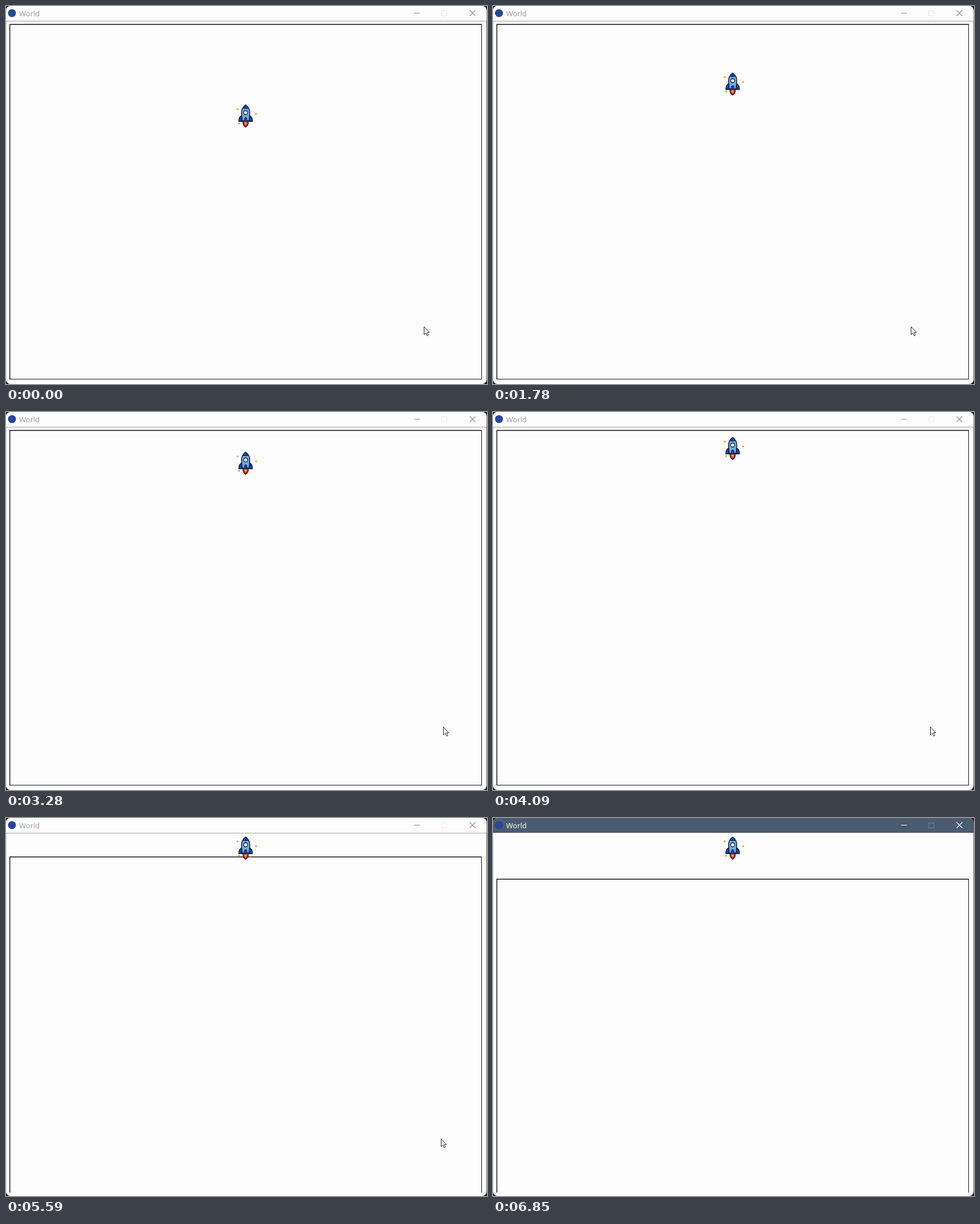
These frames come from a looping animation (845 by 663 pixels, 6.89 s). An HTML page with a canvas:

```html
<!DOCTYPE html>
<html>
<head>
<meta charset="utf-8">
<style>
html, body { margin: 0; width: 100%; height: 100%; overflow: hidden; background: #111; }
canvas { display: block; }
</style>
</head>
<body>
<canvas id="stage" width="845" height="663"></canvas>
<script>
const ctx = document.getElementById('stage').getContext('2d');
const LOOP = 6890, STEP = LOOP / 170;
const SPEED = 0.03145;     // world pixels per ms
const CLIMB = 140;         // rocket stops here, then the scene slides down
const ACTIVE_AT = 6720;    // title bar gains focus
const PAPER = '#fdfdfd', INK = '#0b1638';

// Pointer path: time, x, y
const pointer = [
  [0, 734, 562], [2380, 734, 562], [2680, 768, 552], [4110, 768, 552],
  [4400, 764, 562], [5750, 764, 562], [6200, 781, 638], [6360, 784, 670]
];

function pointerAt(t) {
  const i = pointer.findIndex(p => p[0] > t);
  if (i < 0) return pointer[pointer.length - 1].slice(1);
  const [t0, x0, y0] = pointer[i - 1], [t1, x1, y1] = pointer[i];
  const k = (t - t0) / (t1 - t0), e = k * k * (3 - 2 * k);
  return [Math.round(x0 + (x1 - x0) * e), Math.round(y0 + (y1 - y0) * e)];
}

function rect(color, x, y, w, h) {
  ctx.fillStyle = color;
  ctx.fillRect(x, y, w, h);
}

function shape(path, fill, stroke, width = 1) {
  const p = new Path2D(path);
  if (fill) { ctx.fillStyle = fill; ctx.fill(p); }
  if (stroke) { ctx.strokeStyle = stroke; ctx.lineWidth = width; ctx.stroke(p); }
}

function disc(x, y, r, fill, stroke) {
  ctx.beginPath();
  ctx.arc(x, y, r, 0, 7);
  ctx.fillStyle = fill;
  ctx.fill();
  if (stroke) { ctx.strokeStyle = stroke; ctx.lineWidth = 1.3; ctx.stroke(); }
}

function at(x, y, draw) {
  ctx.save();
  ctx.translate(x, y);
  draw();
  ctx.restore();
}

function spark(x, y, r, color) {
  shape(`M${x} ${y - r}L${x + r} ${y}L${x} ${y + r}L${x - r} ${y}Z`, color);
}

function rocket() {
  for (const [x, y] of [[-14, -12], [18.3, -3.5], [-11.5, 13.2]]) spark(x, y, 2.1, '#cfae32');
  for (const [x, y] of [[-18, 0], [-15, 0], [15.5, -12], [16, 9.5], [-8, -16], [8.5, 16]])
    rect('#c9dce6', x - .6, y - .6, 1.3, 1.3);
  shape('M-4.5 9C-5.5 14-3 18 0 19.4C3 18 5.5 14 4.5 9Z', '#c8202f', '#4a1020', 1.2);
  shape('M-2 9C-3 13-1 15 0 16C1 15 3 13 2 9Z', '#f0a52c');
  shape('M-7-1C-10 1-12.3 3-12 9.5H-5ZM7-1C10 1 12.3 3 12 9.5H5Z', '#1c419f', INK, 1.3);
  shape('M0-19.5C-5-16-7.5-11-7.3-5L-6 8.5H6L7.3-5C7.5-11 5-16 0-19.5Z', '#6fabd9', INK, 1.4);
  shape('M-5-14C-4-17-2-18.7 0-19.5C2-18.7 4-17 5-14Q0-12 -5-14Z', '#1c419f', INK);
  disc(0, -6, 3.5, '#f2f8fb', INK);
  shape('M-2 10V4Q0 .5 2 4V10Z', '#1c419f', INK);
}

function titleBar(active) {
  rect(active ? '#4c5b70' : PAPER, 0, 0, 845, 26);
  if (!active) rect('#a3a3a3', 0, 26, 845, 1);
  disc(10.5, 12.5, 7, '#27479c');
  const tone = active ? '#fff' : '#8c8c8c';
  ctx.fillStyle = active ? '#fff' : '#999';
  ctx.font = '13px "Open Sans", "Noto Sans", sans-serif';
  ctx.fillText('World', 23, 17.5);
  rect(tone, 717, 12, 10, 1);
  shape('M765.5 8.5h9v9h-9z', null, active ? '#76818f' : '#e8e8e8');
  shape('M814.5 7.5l10 10m0-10l-10 10', null, tone, 1.1);
}

function draw(t) {
  const travel = Math.round(t * SPEED);
  const slide = Math.max(0, travel - CLIMB);
  rect('#15171a', 0, 0, 845, 663);
  ctx.save();
  ctx.beginPath();
  ctx.roundRect(0, 0, 844.3, 663, 8);
  ctx.clip();
  rect(PAPER, 0, 0, 845, 663);
  rect('#bdbdb4', 0, 27, .6, 628);
  titleBar(t >= ACTIVE_AT);

  ctx.save();
  ctx.beginPath();
  ctx.rect(0, 27, 845, 630);
  ctx.clip();
  at(0, slide, () => {
    rect('#111', 6, 31.6, 830, 1.5);
    rect('#111', 6, 32, 1.4, 623);
    rect('#111', 835, 32, 1, 623);
    rect('#111', 6, 654, 830, 1);
  });
  at(421, 193 - Math.min(travel, CLIMB), rocket);
  ctx.restore();

  const [x, y] = pointerAt(t);
  at(x + .5, y + .5, () =>
    shape('M0 0V14L3.2 11L5.4 16L7.6 15L5.4 10.2H9.4Z', '#fff', '#222'));
  ctx.restore();
}

const start = performance.now();
function tick() {
  const t = (performance.now() - start) % LOOP;
  draw(Math.floor((t + 5) / STEP) % 170 * STEP);
  requestAnimationFrame(tick);
}
tick();
</script>
</body>
</html>
```
